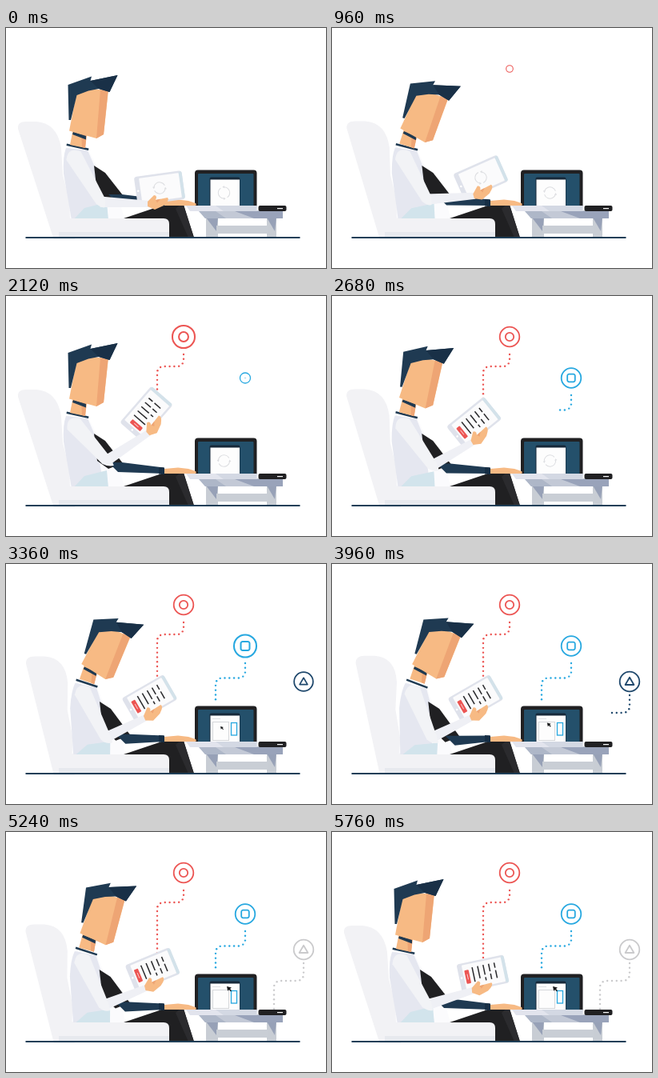
Write an HTML page with a canvas that moves like this. It is 400 by 300 pixels and loops after 5800 ms.

```html
<!DOCTYPE html>
<html lang="en">
<head>
<meta charset="utf-8">
<title>Working at the laptop</title>
<style>
html, body { margin: 0; width: 100%; height: 100%; overflow: hidden; background: #fff; }
canvas { display: block; width: 400px; height: 300px; }
</style>
</head>
<body>
<canvas id="stage"></canvas>
<script>
const LOOP = 5800, FRAME = 40;
const NAVY = '#1f3a52', BLACK = '#202022', SKIN = '#f7ba84', SHADE = '#eea574';
const RED = '#ec5553', BLUE = '#27a8e0', CHAIR = '#f2f2f5', SLEEVE = '#f2f3f6';
const canvas = document.getElementById('stage');
const ctx = canvas.getContext('2d');
const ratio = window.devicePixelRatio || 1;
canvas.width = 400 * ratio;
canvas.height = 300 * ratio;

const clamp = v => Math.max(0, Math.min(1, v));
const span = (t, a, b) => clamp((t - a) / (b - a));
const rise = (t, a, b) => { const v = span(t, a, b); return v * v * (3 - 2 * v); };
const out = v => 1 - Math.pow(1 - v, 3);
const mix = (a, b, k) => a + (b - a) * k;

// Tablet centre and angle, with the elbow of the arm that holds it.
const REST = { x: 192, y: 200, a: -8, ex: 118, ey: 217 };
const LOOK = { x: 186, y: 187, a: -24, ex: 118, ey: 214 };
const LIFT = { x: 175.5, y: 147, a: -49, ex: 125, ey: 206 };
const READ = { x: 179.5, y: 168.5, a: -30, ex: 124, ey: 217 };
const LOWER = { x: 188.5, y: 177, a: -12, ex: 118, ey: 216 };

function blend(p, q, k) {
  const r = {};
  for (const key in p) r[key] = mix(p[key], q[key], k);
  return r;
}
function holdPose(t) {
  let p = blend(REST, LOOK, rise(t, 120, 720));
  p = blend(p, LIFT, rise(t, 1300, 1880));
  p = blend(p, READ, rise(t, 2440, 2900));
  return blend(p, LOWER, rise(t, 4920, 5640));
}
function bodyPose(t) {
  const glance = rise(t, 120, 740) - rise(t, 1300, 1880);
  const work = rise(t, 2440, 3000), sink = rise(t, 2900, 4400);
  const back = 1 - rise(t, 4920, 5640);
  return {
    lean: 4 * glance + (9.5 * work + 9.5 * sink) * back,
    nod: 14 * glance + (17 * work - 1.5 * sink) * back
  };
}

function trace(p) {
  ctx.beginPath();
  for (let i = 0; i < p.length; i += 2) ctx.lineTo(p[i], p[i + 1]);
}
function poly(color, ...p) {
  ctx.fillStyle = color;
  trace(p);
  ctx.fill();
}
function line(color, width, ...p) {
  ctx.strokeStyle = color;
  ctx.lineWidth = width;
  trace(p);
  ctx.stroke();
}
function box(color, x, y, w, h, r = 0) {
  ctx.fillStyle = color;
  ctx.beginPath();
  ctx.roundRect(x, y, w, h, r);
  ctx.fill();
}
function ring(color, width, r, from = 0, to = 7) {
  ctx.strokeStyle = color;
  ctx.lineWidth = width;
  ctx.beginPath();
  ctx.arc(0, 0, r, from, to);
  ctx.stroke();
}
function shape(color, d) {
  ctx.fillStyle = color;
  ctx.fill(new Path2D(d));
}
function within(x, y, angle, draw) {
  ctx.save();
  ctx.translate(x, y);
  ctx.rotate(angle * Math.PI / 180);
  draw();
  ctx.restore();
}
// Turn around a point while keeping stage coordinates.
function turn(x, y, angle, draw) {
  within(x, y, angle, () => {
    ctx.translate(-x, -y);
    draw();
  });
}
function fade(alpha, draw) {
  if (alpha <= 0) return;
  ctx.save();
  ctx.globalAlpha *= alpha;
  draw();
  ctx.restore();
}

function spinner(x, y, angle) {
  within(x, y, angle, () => {
    for (let i = 0; i < 2; i++) {
      ctx.rotate(Math.PI);
      ring('#dddee1', 1, 7.2, 0.3, 2.8);
      poly('#dddee1', 7.2, -0.3, 5.4, 2.4, 8.7, 2.4);
    }
  });
}

// Dots along an S-bend: down, left, down.
function trail(color, x, y, mid, x2, y2, k) {
  if (k <= 0) return;
  const r = 8, bend = r * Math.PI / 2;
  const parts = [mid - r - y, bend, x - x2 - 2 * r, bend, y2 - mid - r];
  const total = parts.reduce((a, b) => a + b);
  ctx.fillStyle = color;
  for (let d = 0; d <= total * k; d += 5.8) {
    let i = 0, s = d;
    while (i < 4 && s > parts[i]) s -= parts[i++];
    const a = s / r;
    const [px, py] = [
      [x, y + s],
      [x - r + r * Math.cos(a), mid - r + r * Math.sin(a)],
      [x - r - s, mid],
      [x2 + r - r * Math.sin(a), mid + r - r * Math.cos(a)],
      [x2, mid + r + s]
    ][i];
    ctx.beginPath();
    ctx.arc(px, py, 1.2, 0, 7);
    ctx.fill();
  }
}

const GLYPHS = {
  circle: () => ctx.arc(0, 0, 5.2, 0, 7),
  square: () => ctx.roundRect(-4.8, -4.8, 9.6, 9.6, 2),
  triangle: () => {
    ctx.moveTo(0, -5.2);
    ctx.lineTo(5.4, 4);
    ctx.lineTo(-5.4, 4);
    ctx.closePath();
  }
};
function badge(t, kind, color, x, y, start, pulse) {
  const k = out(span(t, start, start + 450));
  const inner = out(span(t, start + 80, start + 480));
  if (k <= 0) return;
  const beat = pulse ? 1 + 0.14 * Math.sin(Math.PI * span(t, pulse - 180, pulse + 180)) : 1;
  within(x, y, 0, () => {
    ctx.scale(beat, beat);
    ring(color, 0.7 + 1.1 * k, 12.3 * k);
    if (inner <= 0) return;
    ctx.scale(inner, inner);
    ctx.lineWidth = 1.8;
    ctx.lineJoin = 'round';
    ctx.beginPath();
    GLYPHS[kind]();
    ctx.stroke();
  });
}

function chairBack(lean) {
  const k = lean * 0.0063;
  ctx.save();
  ctx.transform(1, 0, -k, 1, 262 * k, -lean * 0.13);
  shape(CHAIR, 'M15 126Q14 117 25 117L38 117Q64 119 69 150L71 184L86 240L86 265L60 265Z');
  ctx.restore();
}

function torso(lean) {
  turn(92, 262, lean * 0.5, () => {
    poly('#fbfbfd', 76, 149, 103, 153, 114, 174, 142, 218, 148, 238, 80, 238);
    shape('#e5e7f0', 'M75 150L102 153L112 176L122 238L82 240L72 182Q71 160 75 150Z');
    poly('#d2e4ec', 84, 240, 98, 225, 126, 218, 128, 240);
    poly(NAVY, 76, 144.5, 103.5, 150.5, 103, 153, 75.5, 147);
  });
}

function farArm(lean, reach) {
  const sx = 110 + lean * 0.6, ex = 134 + lean * 0.8, ey = 214 + lean * 0.4;
  const wx = 197 + reach;
  poly(BLACK, sx, 172, sx + 14, 181, ex + 12, ey - 5, ex - 6, ey + 2, sx + 4, 206);
  poly(NAVY, ex - 6, ey - 6, ex + 11, ey - 6, wx, 214.5, wx, 222, ex + 6, ey + 6);
  poly('#172f45', wx - 6, 214, wx + 1, 214.5, wx + 1, 223, wx - 6, 222.5);
  within(wx, 0, 0, () =>
    shape(SKIN, 'M1 216L18 214.5L31 216L40 219Q42 222 39 222L1 222Z'));
}

function head(lean, nod) {
  const shift = lean * 1.11;
  ctx.save();
  ctx.translate(lean, -lean * 0.06);
  turn(92, 148, nod * 0.45, () => {
    poly(SKIN, 84, 126, 101, 132, 99, 150, 80, 146);
    poly(SHADE, 94, 130, 101, 132, 99, 150, 95, 149);
    poly(NAVY, 84, 130, 100, 135, 100, 139.5, 83, 133);
  });
  ctx.restore();
  ctx.save();
  ctx.translate(shift, 0);
  turn(92, 135, nod, () => {
    poly(SKIN, 88, 82, 104, 76, 128, 78, 122, 133, 113, 138, 79, 128.5);
    poly(SHADE, 118, 77, 127.5, 79, 122, 133, 113, 138);
    poly(NAVY, 77.5, 71, 107, 60.5, 105.5, 66, 139.5, 59, 129.5, 80, 116, 76,
      103, 78.5, 88.5, 84, 81, 115, 78.5, 115);
    poly('#193047', 105.5, 66, 139.5, 59, 129.5, 80, 116, 76);
  });
  ctx.restore();
}

function tablet(t, { x, y, a }) {
  within(x, y, a, () => {
    box('#dfe2eb', -30, -18, 60, 36, 3.5);
    box('#d3e2ea', 26, -17, 4, 34, 2);
    box('#fbfbfc', -24, -15.5, 50, 31, 1);
    box('#fff', -28.3, -1.3, 2.6, 2.6, 1.3);
    const k = span(t, 1860, 2000);
    fade(1 - k, () => spinner(0, 0, t * 0.3));
    fade(k, () => {
      box(RED, -22, -8.5, 5.5, 17, 1);
      line('#f9caca', 1, -19.2, -3.5, -19.2, 3.5);
      for (let i = 0; i < 5; i++) {
        const lx = -11.5 + i * 7, gap = 8 - i * 3;
        line('#28282b', 1.5, lx, -10.5, lx, gap);
        if (i > 1) line('#28282b', 1.5, lx, gap + 3, lx, 9);
      }
    });
  });
}

function nearArm(lean, { x, y, a, ex, ey }) {
  const rad = (a + 8) * Math.PI / 180;
  const c = Math.cos(rad), s = Math.sin(rad);
  const wx = x - 13 * c - 20 * s, wy = y - 13 * s + 20 * c;
  const d = Math.hypot(wx - ex, wy - ey);
  const nx = -(wy - ey) / d, ny = (wx - ex) / d;
  poly('#eff0f5', ex + nx * 7, ey + ny * 7, ex - nx * 6.5, ey - ny * 6.5,
    wx - nx * 4, wy - ny * 4, wx + nx * 4, wy + ny * 4);
  const sx = 84 + lean * 0.93, sy = 160 - lean * 0.08;
  const len = Math.hypot(ex - sx, ey - sy);
  const ux = (ex - sx) / len, uy = (ey - sy) / len;
  ctx.fillStyle = SLEEVE;
  ctx.beginPath();
  ctx.moveTo(sx + uy * 11, sy - ux * 11);
  ctx.quadraticCurveTo(sx - ux * 14, sy - uy * 14, sx - uy * 10, sy + ux * 10);
  ctx.lineTo(ex - uy * 6, ey + ux * 6);
  ctx.quadraticCurveTo(ex + ux * 9 - uy * 2, ey + uy * 9 + ux * 2, ex + nx * 7 + 6, ey + ny * 7);
  ctx.lineTo(ex + uy * 7, ey - ux * 7);
  ctx.fill();
}

function hand({ x, y, a }) {
  within(x, y, a + 8, () => {
    shape(SKIN, 'M-15 17L-7 9Q-4 9 -4 12L-5 15L10 12Q12 14 9 18L5 22L-6 27L-15 23Z');
    poly(SHADE, -5, 15, 1, 13.8, -3, 18.5);
  });
}

function desk() {
  for (const [x, w] of [[250, 15], [326, 12]]) {
    box('#c8cdd4', x, 236, w, 25);
    poly('#97a1b7', x, 237, x + w, 237, x + w - 2, 254);
  }
  box('#c9ced5', 263, 247, 65, 10);
  poly('#c3c9d6', 241, 228, 346, 228, 346, 238, 249, 238);
  poly('#99a3ba', 286, 229, 346, 229, 346, 238, 310, 238);
  poly('#aeb7c8', 241, 229, 262, 229, 275, 238, 249, 238);
}

function laptop(t) {
  box(BLACK, 236, 177.5, 77.5, 48, 4);
  box('#24506b', 240, 182, 69.5, 42, 1);
  box('#17293a', 254.5, 186.5, 38, 38, 2);
  box('#fdfdfd', 255.5, 189.5, 36.5, 35);
  const k = span(t, 3080, 3220);
  fade(1 - k, () => spinner(272.5, 206, t * 0.3 + 75));
  fade(k, () => {
    ctx.lineWidth = 1;
    ctx.strokeStyle = '#d5d7da';
    ctx.strokeRect(258.5, 197.5, 20, 23);
    line('#dfe1e4', 1, 258, 193.5, 268, 193.5);
    ctx.lineWidth = 1.3;
    ctx.strokeStyle = BLUE;
    ctx.strokeRect(281.5, 198.5, 7, 15.5);
    const up = rise(t, 3720, 4240), across = rise(t, 4600, 4860);
    within(268 + 2 * up + 6 * across, 203 - 10 * up, 0, () => {
      const size = 0.65 + 0.35 * up;
      ctx.scale(size, size);
      poly('#17181a', 0, 0, 6, 1.5, 4, 3, 6, 5.3, 4.9, 6.4, 2.8, 4, 1.2, 5.8);
    });
  });
  poly('#e2e4ed', 225, 222, 313.5, 222, 313.5, 229, 230, 229);
  poly('#d3d8e3', 262, 222, 313.5, 222, 313.5, 229, 272, 229);
}

function draw(t) {
  ctx.setTransform(ratio, 0, 0, ratio, 0, 0);
  ctx.fillStyle = '#fff';
  ctx.fillRect(0, 0, 400, 300);
  const { lean, nod } = bodyPose(t);
  const pose = holdPose(t);
  const reach = 4 * Math.sin(Math.PI * span(t, 4320, 4880));

  const g = span(t, 4360, 4860);
  const third = `rgb(${mix(31, 202, g)},${mix(72, 202, g)},${mix(108, 204, g)})`;
  trail(RED, 222, 73, 88, 189, 160, span(t, 1260, 1860));
  trail(BLUE, 299, 124, 142.5, 262, 174, span(t, 2460, 3060));
  trail(third, 372, 164, 186, 335, 222, span(t, 3640, 4260));
  badge(t, 'circle', RED, 222, 51, 900, 2120);
  badge(t, 'square', BLUE, 299, 102.5, 2020, 3360);
  badge(t, 'triangle', third, 372, 147, 3060);

  chairBack(lean);
  torso(lean);
  desk();
  laptop(t);
  box(BLACK, 315.5, 222, 35, 7, 2);
  box('#fff', 339, 225, 7, 1.2);

  poly(BLACK, 147, 238, 202, 219.5, 221, 218, 235, 262, 203, 262, 196, 242);
  poly('#2b2b2e', 221, 218, 235, 262, 228, 262, 212, 226);
  farArm(lean, reach);
  head(lean, nod);
  shape(CHAIR, 'M60 238H197Q204 238 204 245V262H60Z');
  box('#e7e9ee', 66, 255, 138, 7);
  tablet(t, pose);
  nearArm(lean, pose);
  hand(pose);
  box('#1f3f58', 24.5, 261, 343, 2);
}

const begin = performance.now();
function tick() {
  const t = (performance.now() - begin) % LOOP;
  draw(Math.floor(t / FRAME) * FRAME);
  requestAnimationFrame(tick);
}
tick();
</script>
</body>
</html>
```
